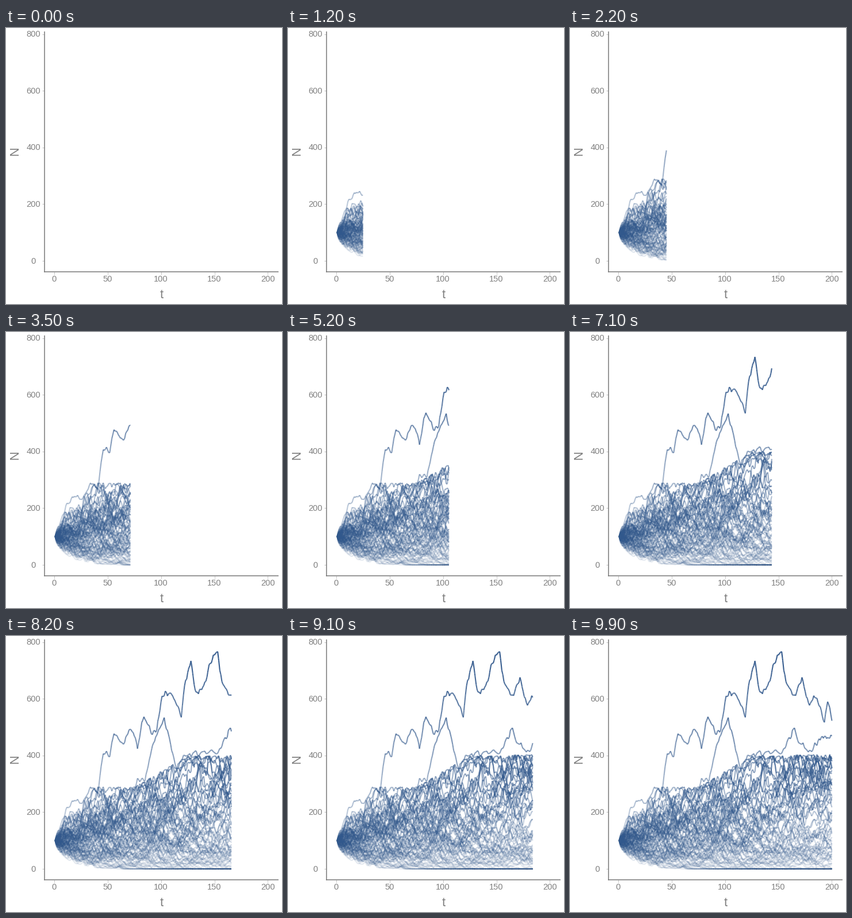
Recreate the animation shown at these times as a matplotlib script. Size 480 by 480 pixels, loop 10000 ms.

```python
import numpy as np
import matplotlib.pyplot as plt
from matplotlib.animation import FuncAnimation
from matplotlib.collections import LineCollection
from matplotlib.colors import to_rgb

SIZE, DPI = 480, 72
FRAMES, STEP_MS = 100, 100
T_END, N_TOP, RUNS = 200, 771, 100
LEFT, RIGHT, TOP, BOTTOM = 67, 474, 6, 424
BLUE, GREY, PALE = "#31588c", "#808080", "#c4c4c4"

days = np.arange(1, T_END + 1)
rng = np.random.default_rng(8)


def px(t):
    return LEFT + (t + 8.95) / 218.9 * (RIGHT - LEFT)


def py(n):
    return BOTTOM - (n / N_TOP + 0.05) / 1.1 * (BOTTOM - TOP)


def through(points):
    t, n = np.array(points).T
    return np.interp(days, t, n)


def smooth_noise(rows):
    """Noise with short swings that mostly undo themselves."""
    e = rng.normal(size=(rows, T_END + 3))
    return (0.6 * (e[:, 3:] + e[:, 2:-1]) - 0.1 * (e[:, 1:-2] + e[:, :-3]))


# Main turning points (t, N) of the runs that leave the crowd
leader = [(1, 100), (12, 215), (21, 245), (26, 228), (34, 292), (41, 268),
          (46, 404), (52, 405), (56, 478), (64, 436), (72, 498), (78, 432),
          (84, 540), (90, 480), (96, 490), (101, 612), (109, 624), (119, 540),
          (123, 674), (128, 724), (133, 620), (140, 645), (147, 732),
          (153, 771), (157, 658), (164, 612), (172, 668), (178, 590),
          (185, 618), (193, 522), (196, 590), (200, 524)]
second = [(70, 240), (78, 310), (85, 312), (93, 449), (103, 530), (108, 455),
          (115, 340), (127, 385), (143, 340), (161, 265), (200, 300)]
third = [(104, 250), (113, 335), (121, 400), (140, 412), (153, 410),
         (165, 498), (168, 453), (180, 412), (188, 460), (200, 465)]
ceiling = through([(1, 115), (12, 210), (35, 295), (75, 290), (100, 345),
                   (125, 400), (200, 405)])
floor = 90 * np.exp(-days / 13)


def simulate(rows):
    """Random walks from 100 with demographic noise; 0 is final."""
    noise = smooth_noise(rows)
    walks = np.full((rows, T_END), 100.0)
    for i in range(1, T_END):
        n = walks[:, i - 1]
        n = n + np.sqrt(n) * noise[:, i]
        n = np.where(n > ceiling[i], 2 * ceiling[i] - n, n)
        n = np.maximum(n, floor[i])
        walks[:, i] = np.where(n < 1, 0, n)
    return walks


def lead(row, points):
    """Send a walk along the points from their start on."""
    t0 = points[0][0]
    path = through(points)
    path += 0.3 * np.sqrt(path) * smooth_noise(1)[0] * (days > t0)
    row[t0 - 1:] = path[t0 - 1:]


walks = simulate(RUNS)
lead(walks[0], leader)
for points in (second, third):
    t0, n0 = points[0]
    lead(walks[np.argmin(abs(walks[:, t0 - 1] - n0))], points)

fig = plt.figure(figsize=(SIZE / DPI, SIZE / DPI), dpi=DPI, facecolor="white")
ax = fig.add_axes([0, 0, 1, 1])
ax.set(xlim=(0, SIZE), ylim=(SIZE, 0))
ax.axis("off")


def label(x, y, text, size=14.6, **kw):
    ax.text(x, y, text, size=size, color=GREY, family="Liberation Sans",
            ha="center", va="center", **kw)


def rule(x, y, color, width):
    ax.plot(x, y, color=color, lw=width, solid_capstyle="butt")


for n in range(0, 801, 200):
    rule([62.5, LEFT], [py(n)] * 2, PALE, 1)
    label(48, py(n) + 0.5, str(n))
for t in range(0, 201, 50):
    rule([px(t)] * 2, [BOTTOM, 428.5], PALE, 1)
    label(px(t), 437, str(t))
rule([LEFT, LEFT], [TOP, BOTTOM + 0.8], GREY, 1.6)
rule([LEFT - 0.8, RIGHT], [BOTTOM, BOTTOM], GREY, 1.6)
label(16, 214.5, "N", 22, rotation=90)
label(270.5, 464, "t", 22)

# One collection per frame holds the pieces revealed in that frame
reveal = np.linspace(1, T_END, FRAMES)
pieces = []
for a, b in zip(reveal[:-1], reveal[1:]):
    inner = days[(days > a + 1e-6) & (days < b - 1e-6)]
    cuts = np.concatenate([[a], inner, [b]])
    n = np.array([np.interp(cuts, days, w) for w in walks])
    xy = np.stack([np.broadcast_to(px(cuts), n.shape), py(n)], axis=-1)
    segs = np.stack([xy[:, :-1], xy[:, 1:]], axis=2).reshape(-1, 2, 2)
    level = n[:, :-1].ravel() / N_TOP
    rgba = np.empty((len(level), 4))
    rgba[:, :3] = to_rgb(BLUE)
    rgba[:, 3] = np.clip(0.1 + 0.9 * level, 0, 1)
    part = LineCollection(segs, colors=rgba, linewidths=2.1,
                          capstyle="butt", snap=False, zorder=3)
    ax.add_collection(part, autolim=False)
    pieces.append(part)


def draw(i):
    for k, part in enumerate(pieces):
        part.set_visible(k < i)
    return pieces


anim = FuncAnimation(fig, draw, frames=FRAMES, interval=STEP_MS,
                     repeat=True, repeat_delay=0, blit=False)
plt.show()
```
